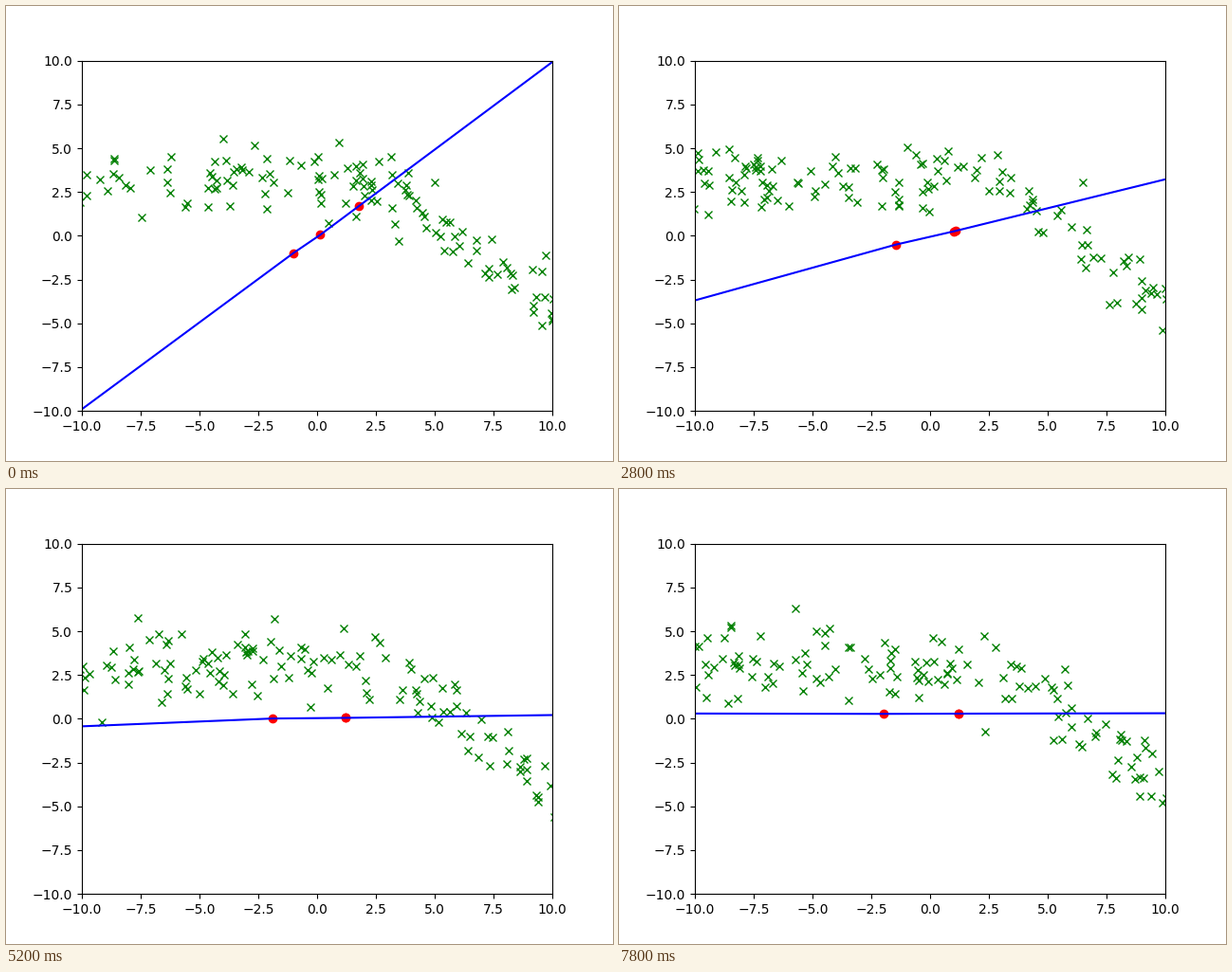
A matplotlib script for the animation above (8 s loop, 640 by 480 pixels).

```python
import matplotlib.pyplot as plt
import numpy as np
from matplotlib.animation import FuncAnimation

FRAMES, STEP_MS = 40, 200
POINTS = 128
EDGE = 10


def ramp(t, a, b, start, end):
    """Go from a to b with a soft start and stop."""
    s = np.clip((t - start) / (end - start), 0, 1)
    return a + (b - a) * (s + s * s * (3 - 2 * s)) / 2


def decay(t, end, power):
    """Fall from 1 to 0 at time end, ever more slowly."""
    return max(1 - t / end, 0) ** power


def fit(t):
    """Bent line: left end, three knots, right end."""
    left = 0.3 - 10.2 * decay(t, 33, 1.7)
    right = 0.18 + 9.74 * decay(t, 22, 1.15) + 0.008 * max(t - 22, 0)
    bias = ramp(t, -0.08, 0.29, 21, 36)

    x1 = ramp(t, -1.0, -1.97, 0, 29)
    y1 = ramp(t, -0.98, 0.28, 0, 35)
    x2 = ramp(t, 0.13, 1.19, 0, 18)
    x3 = max(x2, ramp(t, 1.77, 1.04, 4, 15))  # the last two knots merge

    slope = (right - bias) / EDGE
    x = np.array([-EDGE, x1, x2, x3, EDGE])
    y = np.array([left, y1, bias + slope * x2, bias + slope * x3, right])
    return x, y


def sample(t):
    """Fresh noisy batch: flat at 3, then falling with slope -1."""
    rng = np.random.default_rng(100 + t)
    x = rng.uniform(-10.1, 10.1, POINTS)
    y = 3 - np.maximum(x - 3, 0) + rng.normal(0, 1, POINTS)
    return x, y


fig, ax = plt.subplots(figsize=(6.4, 4.8), dpi=100)
ax.set_xlim(-EDGE, EDGE)
ax.set_ylim(-EDGE, EDGE)
data, = ax.plot([], [], "gx")
knots, = ax.plot([], [], "ro")
line, = ax.plot([], [], "b-")


def draw(t):
    x, y = fit(t)
    data.set_data(*sample(t))
    knots.set_data(x[1:-1], y[1:-1])
    line.set_data(x, y)
    return data, knots, line


anim = FuncAnimation(fig, draw, frames=FRAMES, init_func=lambda: draw(0),
                     interval=STEP_MS, repeat=True, repeat_delay=0)
plt.show()
```
